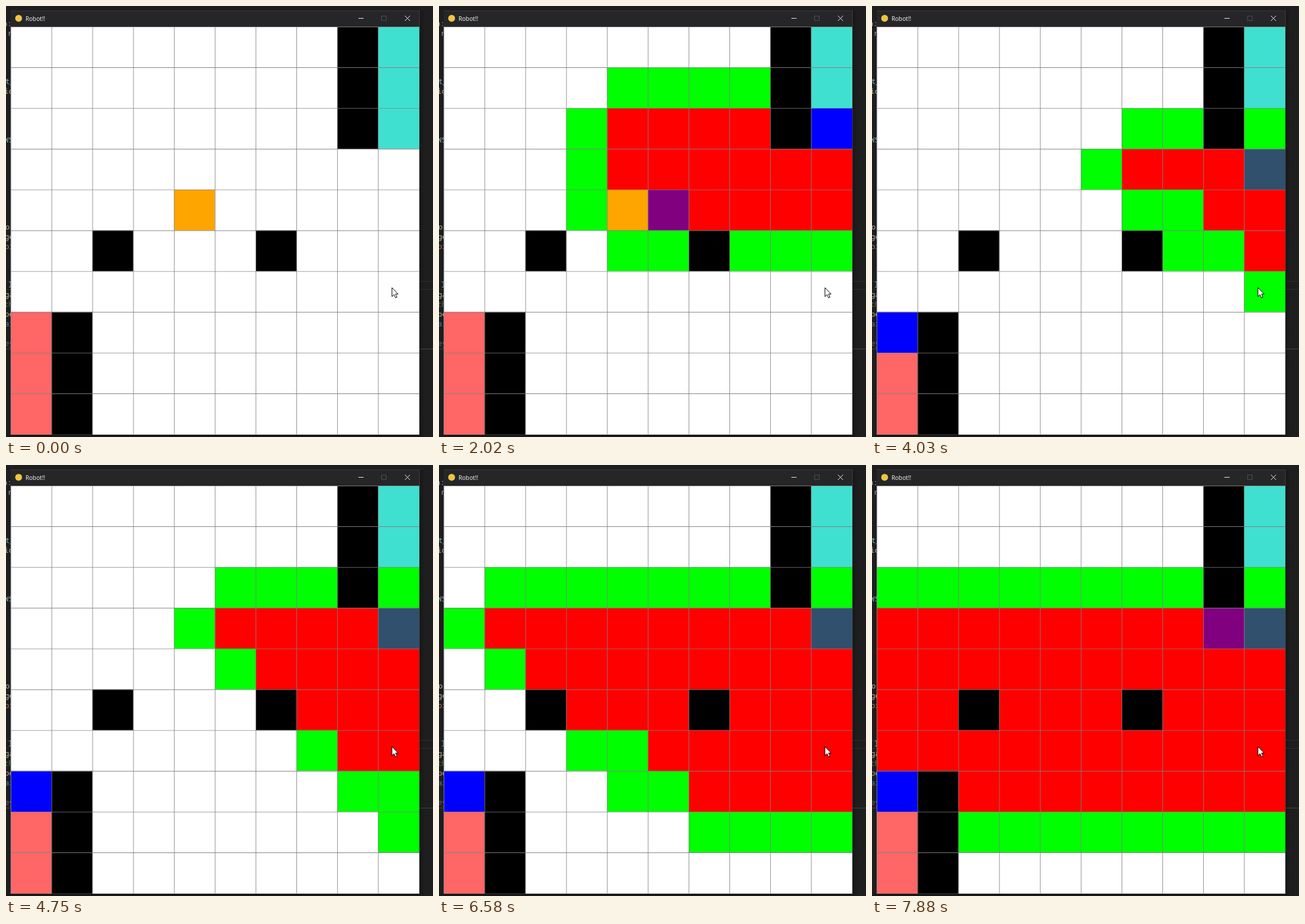
These frames come from a looping animation (744x752 px, 8000 ms). An HTML page:

```html
<!DOCTYPE html>
<html lang="en">
<head>
<meta charset="utf-8">
<title>Robot!!</title>
<style>
  html, body { margin: 0; width: 100%; height: 100%; overflow: hidden; background: #1e1e1e; }
  svg { display: block; width: 744px; height: 752px; }
  .code { font: 12.4px "Noto Sans Mono", "DejaVu Sans Mono", monospace; }
  .title { font: 10.3px "Open Sans", "Noto Sans", sans-serif; fill: #fff; }
</style>
</head>
<body>
<svg viewBox="0 0 744 752">
  <defs>
    <linearGradient id="shade">
      <stop offset="0" stop-color="#161616"/>
      <stop offset="1" stop-color="#1e1e1e"/>
    </linearGradient>
    <clipPath id="margin"><path d="M0 0H8V752H0z"/></clipPath>
  </defs>

  <!-- editor behind the window -->
  <path fill="#1e1e1e" d="M0 0H744V752H0z"/>
  <path fill="url(#shade)" d="M720 9H729V752H720z"/>
  <path fill="#191919" d="M0 748H728V752H0z"/>
  <path fill="none" stroke="#303030" d="M0 480.5H8M0 494.5H8M720 480.5H744M720 494.5H744"/>
  <path fill="none" stroke="#464646" d="M0 598.5H8M720 598.5H744"/>
  <g id="code" class="code" clip-path="url(#margin)"></g>

  <!-- window frame -->
  <path fill="#3c3c3e" d="M8 8H721V748H8z"/>
  <path fill="#262628" d="M8 9H720V36H8z"/>
  <circle cx="22" cy="21.5" r="6" fill="#efc443"/>
  <text class="title" x="34" y="25.6">Robot!!</text>
  <g fill="none">
    <path stroke="#f4f4f4" d="M614 21.5H623M695 17L704 26M704 17L695 26"/>
    <path stroke="#435654" d="M654.5 17.5H662.5V25.5H654.5z"/>
  </g>

  <path fill="#fff" d="M8.3 36H720V747.6H8.3z"/>
  <g id="cells"></g>
  <path id="lines" fill="#808080"/>
  <path fill="#fff" stroke="#000" d="M672.5 491.5V507L676.1 503.6L678.7 509.2L681.2 508.1L678.7 502.6H683.2z"/>
</svg>
<script>
const SIZE = 10, PITCH = 640 / 9, LINE = 8 / 9, LEFT = 8.3, TOP = 36, LOOP = 8000;
const COLOR = {
  free: '#fff', wall: '#000', robot: '#ffa500', loaded: '#30506e', goal: '#00f',
  open: '#0f0', closed: '#f00', path: '#800080', pickup: '#40e0d0', dropoff: '#ff6666'
};
const svgNS = 'http://www.w3.org/2000/svg';

function add(parent, tag, attrs, text = '') {
  const node = document.createElementNS(svgNS, tag);
  for (const name in attrs) node.setAttribute(name, attrs[name]);
  node.textContent = text;
  return parent.appendChild(node);
}

// Visible ends of the code lines: text, x, baseline, colour
[
  ['a:', -5, 35, '#a8a8a8'], ['n', 4, 52, '#a8a8a8'], ['t_', -1, 136, '#7fb8c9'],
  ['ic', -3, 153, '#b5b59a'], ['WS', -3, 238, '#8fb5c0'], ['o', -1, 390, '#b8b8a0'],
  ['ge', -2, 407, '#b8b8a0'], ['or', -2, 424, '#b0795f'], ['l', 4, 491, '#7fb8c9'],
  ['ga', -2, 508, '#b8b8a0'], ['th', -3, 525, '#4f7a45'], ['pe', -2, 542, '#b8b8a0'],
  ['ai', -2, 559, '#4a84b0'], ['ey', -2, 593, '#686868']
].forEach(([text, x, y, fill]) => add(code, 'text', { x, y, fill }, text));

const at = (row, col) => row * SIZE + col;
const rowOf = cell => Math.floor(cell / SIZE);
const colOf = cell => cell % SIZE;
const distance = (a, b) => Math.abs(rowOf(a) - rowOf(b)) + Math.abs(colOf(a) - colOf(b));

function neighbours(cell) {
  return [[0, 1], [0, -1], [1, 0], [-1, 0]]
    .map(([dr, dc]) => [rowOf(cell) + dr, colOf(cell) + dc])
    .filter(([r, c]) => r >= 0 && r < SIZE && c >= 0 && c < SIZE)
    .map(([r, c]) => at(r, c));
}

const grid = Array(SIZE * SIZE).fill('free');
for (let i = 0; i < 3; i++) {
  grid[at(i, 8)] = grid[at(7 + i, 1)] = 'wall';
  grid[at(i, 9)] = 'pickup';
  grid[at(7 + i, 0)] = 'dropoff';
}
grid[at(5, 2)] = grid[at(5, 6)] = 'wall';
grid[at(4, 4)] = 'robot';

const states = [];
const record = () => states.push(grid.slice());

// A* with Manhattan distance; ties go to the cell found first
function search(start, goal) {
  const cost = { [start]: 0 }, from = {}, open = [start];
  const score = cell => cost[cell] + distance(cell, goal);
  grid[goal] = 'goal';
  while (open.length) {
    const best = Math.min(...open.map(score));
    const current = open.splice(open.findIndex(cell => score(cell) === best), 1)[0];
    for (const next of neighbours(current)) {
      if (next in cost || grid[next] === 'wall') continue;
      cost[next] = cost[current] + 1;
      from[next] = current;
      if (next === goal) continue;
      open.push(next);
      grid[next] = 'open';
    }
    if (!(goal in from)) record();
    if (current !== start) grid[current] = 'closed';
    if (goal in from) break;
  }
  const path = [];
  for (let cell = from[goal]; cell !== start; cell = from[cell]) path.unshift(cell);
  return path;
}

function showPath(path) {
  for (const cell of path) {
    grid[cell] = 'path';
    record();
  }
}

function drive(start, path) {
  grid.forEach((kind, cell) => {
    if (kind === 'open' || kind === 'closed') grid[cell] = 'free';
  });
  let robot = start;
  for (const cell of path) {
    grid[robot] = 'free';
    grid[robot = cell] = 'robot';
    record();
  }
  return robot;
}

record();
const first = search(at(4, 4), at(2, 9));
showPath(first);
const loadedAt = drive(at(4, 4), first);
grid[loadedAt] = 'loaded';
showPath(search(loadedAt, at(7, 0)).slice(0, 1));

// Evenly paced runs of redraws: first time, last time, count
const times = [0];
[
  [520, 790, 4], [940, 1740, 9], [1830, 2020, 3], [2150, 2530, 5], [2730, 3060, 4],
  [3140, 3430, 4], [3580, 4030, 6], [4170, 4950, 9], [5040, 5120, 2], [5270, 5450, 3],
  [5560, 5730, 3], [5880, 6580, 8], [6670, 6930, 4], [7090, 7440, 5], [7600, 7880, 4]
].forEach(([from, to, count]) => {
  for (let i = 0; i < count; i++)
    times.push(Math.floor((from + (to - from) * i / (count - 1)) / 10) * 10);
});

// Cells overlap slightly so that no seam shows beside the grid lines
const rects = grid.map((_, cell) => add(cells, 'rect', {
  x: LEFT + colOf(cell) * PITCH, y: TOP + rowOf(cell) * PITCH,
  width: PITCH + 0.6, height: PITCH + 0.6
}));
let outline = '';
for (let i = 0; i < SIZE; i++) {
  outline += `M${LEFT + i * PITCH} ${TOP}h${LINE}V747.6h${-LINE}z`;
  outline += `M${LEFT} ${TOP + i * PITCH}H720v${LINE}H${LEFT}z`;
}
lines.setAttribute('d', outline);

const begin = performance.now();
let shown = -1;
function tick() {
  const now = (performance.now() - begin) % LOOP;
  let index = times.length - 1;
  while (times[index] > now) index--;
  if (index !== shown) {
    shown = index;
    rects.forEach((rect, cell) => rect.setAttribute('fill', COLOR[states[index][cell]]));
  }
  requestAnimationFrame(tick);
}
tick();
</script>
</body>
</html>
```
